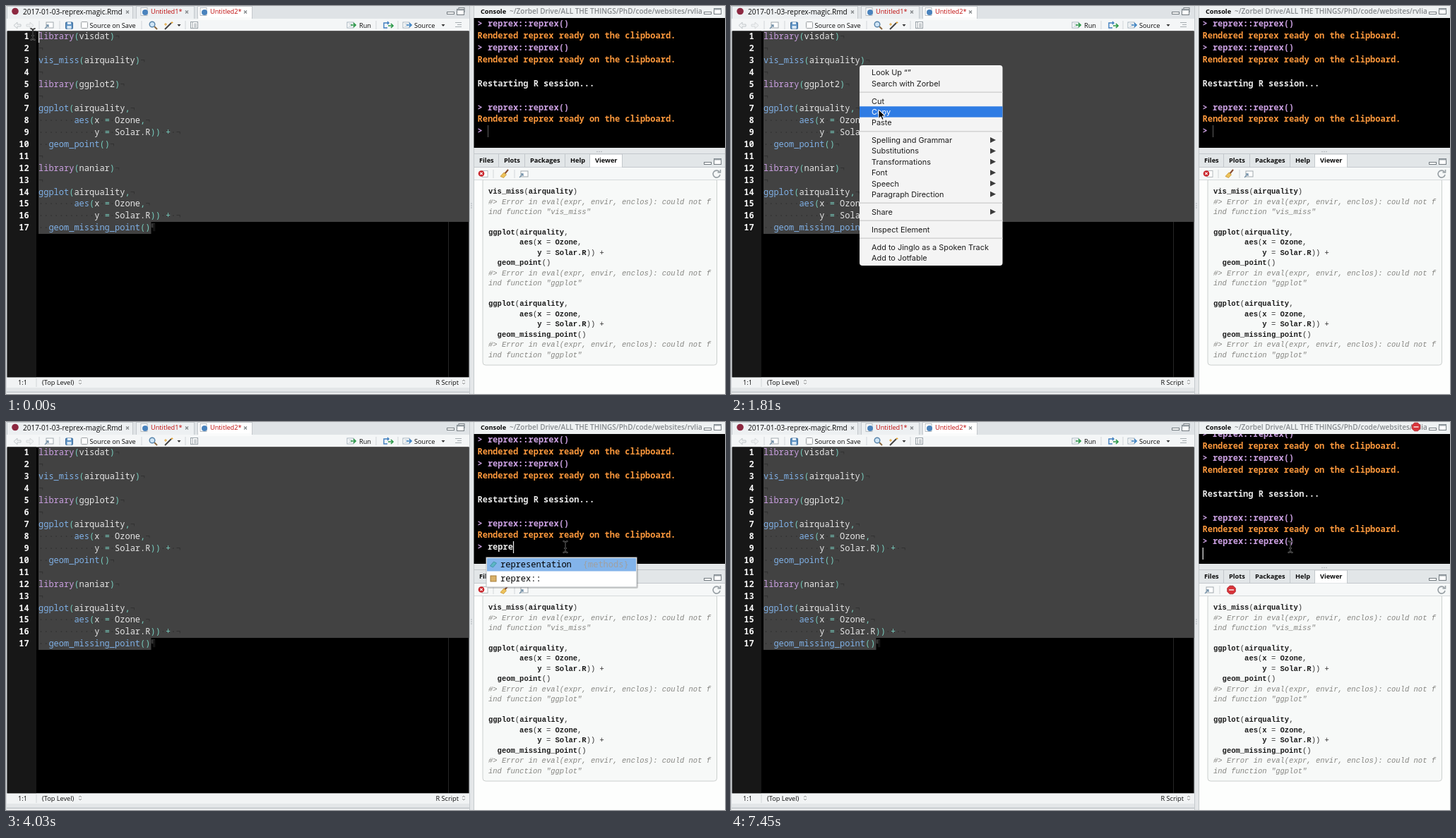
Recreate the animation shown at these times as an HTML page. Size 1018 by 550 pixels, loop 8000 ms.

```html
<!DOCTYPE html>
<html lang="en">
<head>
<meta charset="utf-8">
<title>Editor session</title>
<style>
html, body { margin: 0; width: 100%; height: 100%; overflow: hidden; background: #d9dde0; }
svg { display: block; width: 1018px; height: 550px; }
text { white-space: pre; font: 9.2px "Open Sans", sans-serif; fill: #0a0a0a; }
.bold { font-weight: 700; }
.file { font-size: 10px; }
.path { font-size: 10px; font-weight: 600; fill: #85898c; }
.red { fill: #c00d0d; }
.code { font: 500 12px "Noto Sans Mono", monospace; fill: #e6e6e6; }
.log { font-weight: 600; }
.num { font-weight: 600; fill: #f6f6f6; text-anchor: end; }
.key { fill: #cba0e2; }
.fun { fill: #7fb0e6; }
.op { fill: #76cabb; }
.ghost { fill: #303030; }
.pkg { fill: #f0d04a; }
.msg { fill: #fb983c; }
.item { font: 500 12px "Noto Sans Mono", monospace; fill: #000; }
.from { fill: #a0a0a0; }
.out { font: 10.5px "Liberation Mono", monospace; fill: #333; }
.name { font-weight: 700; fill: #1c1c1c; }
.note { font-style: italic; fill: #868682; }
.menu { font: 10.9px Inter, sans-serif; fill: #1e1e1e; }
.picked { fill: #fff; }
</style>
</head>
<body>
<svg id="stage" viewBox="0 0 1018 550" xmlns="http://www.w3.org/2000/svg"></svg>
<script>
const LOOP = 8000, CELL = 7.2, ROW = 16.94;
const esc = s => s.replace(/&/g, '&amp;').replace(/</g, '&lt;').replace(/>/g, '&gt;');
const span = (cls, s) => `<tspan class="${cls}">${esc(s)}</tspan>`;
const raw = (x, y, cls, body) => `<text x="${x}" y="${y}" class="${cls}">${body}</text>`;
const text = (x, y, s, cls = '') => raw(x, y, cls, esc(s));
const rect = (x, y, w, h, fill, more = '') =>
  `<rect x="${x}" y="${y}" width="${w}" height="${h}" fill="${fill}" ${more}/>`;
const path = (d, stroke, width = 1, fill = 'none') =>
  `<path d="${d}" stroke="${stroke}" stroke-width="${width}" fill="${fill}"/>`;
const dot = (x, y, r, fill) => `<circle cx="${x}" cy="${y}" r="${r}" fill="${fill}"/>`;
const group = (id, body, more = '') => `<g id="${id}" ${more}>${body}</g>`;

// Syntax colouring
function paint(line, dots) {
  return line.replace(/[\w.]+|\s|[^\w.\s]/g, (tok, at) => {
    if (tok === ' ') return dots ? span('ghost', '·') : ' ';
    if (!/\w/.test(tok)) return span('op', tok);
    if (tok === 'library') return span('key', tok);
    if (line.startsWith('::', at + tok.length)) return span('pkg', tok);
    return line[at + tok.length] === '(' ? span('fun', tok) : esc(tok);
  });
}

const plot = geom => ['ggplot(airquality,', '       aes(x = Ozone,', '           y = Solar.R)) +', `  ${geom}()`];
const script = ['library(visdat)', '', 'vis_miss(airquality)', '', 'library(ggplot2)', '',
  ...plot('geom_point'), '', 'library(naniar)', '', ...plot('geom_missing_point')];
const failure = fn => ['#> Error in eval(expr, envir, enclos): could not f', `ind function "${fn}"`];
const report = ['vis_miss(airquality)', ...failure('vis_miss'), '', ...plot('geom_point'),
  ...failure('ggplot'), '', ...plot('geom_missing_point'), ...failure('ggplot')];

// Small icons
const closeMark = x => path(`M${x - 2} 6.5l4 4m0 -4l-4 4`, '#85898c', 1.3);
const sizeBox = (x, y) => rect(x, y, 10, 8, '#fff', 'stroke="#737b80"') + rect(x, y, 10, 2, '#9aa2a7');
const paneButtons = y => rect(988.5, y + 2.5, 10, 3, '#fff', 'stroke="#737b80"') + sizeBox(1002.5, y - 2.5);
const popout = (x, y) => rect(x - 4, y - 4, 10, 8, '#fff', 'stroke="#a1a9ae"') +
  path(`M${x - 6} ${y + 5}l5 -5m-3 0h3v3`, '#7290a8', 1.3);
const arrowTo = (x, y, dir, color) =>
  path(`M${x - 5 * dir} ${y - 1.5}h${5 * dir}v-3l${5 * dir} 4.5l${-5 * dir} 4.5v-3h${-5 * dir}z`, color, 1, '#f0f2f3');
const divider = (x, y) => path(`M${x} ${y - 6}v12`, '#d2d6d9');
const dropMark = (x, y) => path(`M${x - 2.5} ${y - 1}h5l-2.5 3z`, 'none', 0, '#333');
const updown = (x, y) => path(`M${x - 2} ${y - 1}l2 -2l2 2m-4 2l2 2l2 -2`, '#777', .8);
const sheet = (x, y) => rect(x - 4, y - 4, 9, 8, '#fff', 'stroke="#a6b4be"') +
  path(`M${x - 2} ${y - 1.5}h5m-5 3h5`, '#b7c3cc');
const goArrow = (x, y, color) => path(`M${x - 4} ${y}h7m-3 -3l3 3l-3 3`, color, 1.7);
const stopSign = (x, y, r) => {
  const k = r * .42;
  return path(`M${x - k} ${y - r}h${2 * k}L${x + r} ${y - k}v${2 * k}L${x + k} ${y + r}h${-2 * k}L${x - r} ${y + k}v${-2 * k}z`,
    '#a81c22', .8, '#d8343a') + rect(x - r * .6, y - 1, r * 1.2, 2, '#efb9b9');
};
const docTab = (x, label) => rect(x - 6, 2.5, 9, 11, '#fff', 'stroke="#a9b0b5" stroke-width=".8"') +
  dot(x, 9, 4, '#4a83bd') + text(x + 8, 11.3, label, 'red');

function sourcePane() {
  const lines = script.map((line, i) => {
    const y = 47.3 + i * ROW, end = i === script.length - 1 ? '¶' : '¬';
    const tail = line.endsWith('+') ? '·' : '';
    return text(32.6, y, String(i + 1), 'code num') + raw(46, y, 'code', paint(line, true) + span('ghost', tail + end));
  }).join('');
  return rect(0, 0, 657, 18, '#dfe3e6') +
    rect(1.5, .5, 178, 18, '#edf0f2', 'stroke="#c3c8cc"') + rect(184.5, .5, 82, 18, '#edf0f2', 'stroke="#c3c8cc"') +
    rect(271.5, .5, 77, 20, '#fff', 'stroke="#c3c8cc"') +
    rect(1, 18, 655, 18, '#f4f6f7') + rect(272, 16, 76, 4, '#fafbfb') +
    dot(13, 7.5, 4.8, '#8c2840') + text(24, 11.5, '2017-01-03-reprex-magic.Rmd', 'file') +
    docTab(197, 'Untitled1*') + docTab(281, 'Untitled2*') + [172, 256, 339].map(closeMark).join('') +
    rect(624.5, 8.5, 10, 3, '#fff', 'stroke="#737b80"') + rect(641, 2.5, 8, 6, '#fff', 'stroke="#737b80"') + sizeBox(638.5, 4.5) +
    arrowTo(16, 27.5, -1, '#c3c8cb') + arrowTo(34, 27.5, 1, '#d6d9db') +
    [47, 76, 192, 254, 524, 555].map(x => divider(x, 27)).join('') + popout(61, 27) +
    rect(84.5, 23, 10, 9.5, '#5d92c4', 'rx="1" stroke="#3f6c98"') + rect(87, 23, 5, 3, '#e7f0f8') + rect(86.5, 28, 6, 4.5, '#dbe8f3') +
    rect(106.5, 22.5, 9, 9, '#fff', 'rx="1" stroke="#9b9fa2"') + text(118.5, 30.7, 'Source on Save') +
    path('M210 29l4 4', '#8b6a42', 2) + '<circle cx="207" cy="26" r="3.8" fill="#cfe4f5" stroke="#5683aa" stroke-width="1.4"/>' +
    path('M225 33l9 -9', '#444', 2) + path('M226 24v4m-2 -2h4m7 -4v3m-1.5 -1.5h3', '#e2a132') + dropMark(245, 27) +
    rect(261.5, 22.5, 10, 9, '#fff', 'stroke="#98a1a7"') + path('M264 23v9m2 -6.5h4m-4 2h4m-4 2h4', '#98a1a7') +
    sheet(487, 27) + goArrow(492, 27, '#2f9a4b') + text(500, 30.7, 'Run') +
    path('M540 31h-5v-7h7m-2 -2l2 2l-2 2', '#3f7fc0', 1.4) + goArrow(545, 28, '#2f9a4b') +
    sheet(566, 27) + goArrow(571, 27, '#4286c5') + text(578, 30.7, 'Source') + dropMark(619, 27) +
    path('M636 23.5h9m-6 3h6m-9 3h9', '#a6adb1') +
    rect(1.5, 35.5, 654, 491, '#000') + rect(2, 35.5, 41, 491, '#171717') + path('M626.5 36V526', '#262626') +
    rect(46, 35.5, 609.5, 270.5, '#424242') + rect(46, 306, 159.5, 17, '#424242') + lines +
    rect(1, 526.5, 655, 14.5, '#f1f3f4') + text(17, 536.5, '1:1') + divider(43, 534) +
    text(51, 536.5, '(Top Level)') + updown(105, 533) + text(608.5, 536.5, 'R Script') + updown(648, 533) +
    rect(1, 541, 655, 5, '#e3e6e8') + path('M1 547.5H656', '#b9bec2') + rect(1, 548, 655, 2, '#eef0f1') +
    rect(656, 0, 6, 550, '#e4e7e9') + path('M656.5 0V550M662.5 0V550', '#c5cacd') +
    [280, 283, 286].map(y => dot(659, y, .8, '#a9afb3')).join('');
}

function consolePane() {
  const call = ['key', '> reprex::reprex()'], done = ['msg', 'Rendered reprex ready on the clipboard.'], gap = ['', ''];
  const log = [call, done, call, done, gap, ['', 'Restarting R session...'], gap, call, done, ['key', '> ']];
  const lines = log.map(([cls, s], i) => text(667.5, 29.2 + i * 16.9, s, 'code log ' + cls)).join('');
  return rect(663, 0, 355, 17, '#eef1f2') + text(672, 11.2, 'Console', 'bold') +
    text(713, 11.2, '~/Zorbel Drive/ALL THE THINGS/PhD/code/websites/rvlia', 'path') +
    rect(986, 1, 32, 14, '#eef1f2') + paneButtons(6) + group('busy', stopSign(970, 7, 5.8)) +
    rect(662.5, 17, 355.5, 184, '#000') +
    '<g clip-path="url(#screen)">' + group('scroll', lines + '<text id="input" x="681.9" y="181.3" class="code log"></text>') +
    rect(1011, 28, 5, 170, '#fff', 'id="thumb" rx="2.5"') + '</g>' + rect(0, 0, 1.2, 17, '#eee', 'id="caret"');
}

function viewerPane() {
  const lines = report.map((line, i) => {
    const note = /^(#>|ind)/.test(line);
    const body = note ? span('note', line) : line.replace(/[\w.]+/g, w => span('name', w));
    return raw(683, (266 + i * 14.47).toFixed(1), 'out', body);
  }).join('');
  const tabs = [[670, 'Files'], [705, 'Plots'], [742, 'Packages'], [799, 'Help'], [834, 'Viewer']];
  return rect(663, 201, 355, 8.5, '#e4e7e9') + [837, 840, 843].map(x => dot(x, 206.5, .8, '#a9afb3')).join('') +
    rect(663, 209, 355, 19, '#e2e6e8') + path('M663 209.5H1018M663 228.5H1018', '#c3c8cc') +
    [697.5, 734.5, 791.5].map(x => path(`M${x} 210v18`, '#c3c8cc')).join('') +
    rect(826.5, 210, 46, 19, '#fff', 'stroke="#c3c8cc"') +
    tabs.map(([x, s]) => text(x, 221.5, s, 'bold')).join('') + paneButtons(219) +
    rect(663, 247, 355, 303, '#fdfefd') + rect(675, 244, 331.5, 265, '#f7f9f8', 'rx="4" stroke="#ccd0ce"') +
    rect(663, 229, 355, 17.5, '#f6f8f8') + path('M663 246.5H1018', '#d5d9db') +
    path('M1010 235a5 5 0 1 0 1 4m.5 -7v4h-4', '#98a0a5', 1.6) +
    group('idleTools', rect(674, 233.5, 8, 9, '#fff', 'stroke="#b4babd"') + dot(673, 237.5, 4.3, '#c9262c') +
      path('M671.3 235.8l3.4 3.4m0 -3.4l-3.4 3.4', '#fff', 1.2) + divider(690, 238) +
      path('M711 232l-5 6', '#8a4c2f', 2) + path('M705 236l3.5 3l-4 4.5l-4.5 -2z', '#c89531', .8, '#edc35b') +
      divider(720, 238) + popout(733, 238)) +
    group('busyTools', popout(677, 238) + divider(692, 238) + stopSign(708.5, 238, 5.8)) + lines;
}

const menuItems = [[94, 'Look Up “”'], [109.5, 'Search with Zorbel'], [134.5, 'Cut'], [150, 'Copy'], [165.3, 'Paste'],
  [190, 'Spelling and Grammar', 1], [205.4, 'Substitutions', 1], [220.8, 'Transformations', 1], [236.2, 'Font', 1],
  [251.5, 'Speech', 1], [266.8, 'Paragraph Direction', 1], [291.7, 'Share', 1], [316.6, 'Inspect Element'],
  [341.5, 'Add to Jinglo as a Spoken Track'], [356.8, 'Add to Jotfable']];
function contextMenu() {
  const items = menuItems.map(([y, label, sub]) => text(199, y + 4, label, 'menu') +
    (sub ? path(`M367 ${y - 4}l8 4l-8 4z`, 'none', 0, '#3c3c3c') : '')).join('');
  return rect(182, 84, 202.5, 284, '#f4f4f4', 'rx="4"') +
    [122.3, 177.8, 279.3, 304.3, 329.2].map(y => path(`M182 ${y}h202.5`, '#d3d3d3', 1.5)).join('') +
    rect(182, 0, 202.5, 15.4, '#2f7ce4', 'id="hover"') + items;
}

function completions(x, width, rows, pkgAt) {
  const h = rows.length * 20 + 2;
  return rect(x + 2, 194, width, h, '#000', 'opacity=".18" rx="2"') +
    rect(x, 192, width, h, '#fff', 'stroke="#b9bdc0"') + rect(x + 1, 193, width - 2, 18.5, '#83b4ea', 'class="pick"') +
    rows.map(([name, from], i) => {
      const y = 202 + i * 20, isPkg = name.endsWith('::');
      return (isPkg ? rect(x + 6, y - 4, 8, 8, '#d9b26a', 'stroke="#a67c36"')
        : path(`M${x + 5.5} ${y + 2}l5 -6l4 2l-5 6z`, '#3a8fa0', .8, '#5cb6c4')) +
        text(x + 20, y + 4.2, name, 'item') + text(pkgAt, y + 4.2, from, 'item from');
    }).join('');
}

const exported = ['reprex', 'reprex_addin', 'reprex_clean', 'reprex_invert', 'reprex_rescue'].map(n => [n, '{reprex}']);
const candidates = [['representation', '{methods}'], ['reprex::', '']];
const beam = 'M-3.5 -8q3.5 0 3.5 3v10q0 3 -3.5 3M3.5 -8q-3.5 0 -3.5 3v10q0 3 3.5 3M-2 2h4';

document.getElementById('stage').innerHTML =
  '<defs><clipPath id="screen"><rect x="662" y="17" width="356" height="184"/></clipPath></defs>' +
  rect(0, 0, 1018, 550, '#d9dde0') + sourcePane() + consolePane() + viewerPane() +
  rect(46, 36, 1.2, 16, '#eaeaea', 'id="editCaret"') + group('menu', contextMenu()) +
  group('popFirst', completions(680, 213, candidates, 816.8)) + group('popSecond', completions(739, 198, exported, 869)) +
  group('beam', path(beam, '#6c6c6c', 1.8) + path(beam, '#1c1c1c', .8)) +
  group('arrow', path('M0 0v12.5l3 -2.7l2 4.7l2.2 -1l-2 -4.5h4z', '#fff', 1, '#000'));

// Step tables: [time, value]
const steps = {
  pointer: [[0, [38, 40]], [150, [88, 214]], [300, [150, 180]], [450, [178, 112]], [620, [180, 89]],
    [1070, [180, 86, 1]], [1220, [186, 95, 1]], [1370, [194, 109, 1]], [1520, [203, 132, 1]], [1670, [209, 147, 1]],
    [2110, [480, 164, 1]], [2250, [742, 172, 1]], [2400, [785, 176]], [2550, [792, 177]]],
  hover: [[0, -1], [1220, 0], [1370, 1], [1520, 2], [1670, 3], [1820, -1], [1960, 3]],
  menu: [[0, 0], [1070, 1], [2110, .6], [2250, .14], [2400, 0]],
  editCaret: [[0, 1], [450, 0], [920, 1], [1370, 0], [1820, 1], [2700, 0]],
  typed: [[0, ''], [3440, 're'], [3580, 'repr'], [3730, 'repre'], [4630, 'reprex::'], [5080, 'reprex::reprex()']],
  caret: [[0, .35], [2700, 1], [3290, 0], [3440, 1], [4330, 0], [4630, 1], [5970, 0], [6420, 1], [7010, 0], [7450, 1]],
  popup: [[0, 0], [4030, 1], [4630, 2], [5080, 0]],
  thumb: [[0, 0], [5520, .1], [5970, .05], [6120, 0]],
};
const at = (name, t) => steps[name].findLast(([start]) => start <= t)[1];
const el = id => document.getElementById(id);
const set = (id, name, value) => el(id).setAttribute(name, value);
const fade = (id, value) => set(id, 'opacity', +value);
const labels = [...document.querySelectorAll('#menu text')];
const firstPick = document.querySelector('#popFirst .pick');

function draw(t) {
  const [x, y, isArrow] = at('pointer', t), hover = at('hover', t);
  set('beam', 'transform', `translate(${x} ${y})`);
  set('arrow', 'transform', `translate(${x} ${y})`);
  fade('beam', !isArrow);
  fade('arrow', !!isArrow);

  fade('menu', at('menu', t));
  fade('hover', hover >= 0);
  set('hover', 'y', hover < 0 ? 0 : menuItems[hover][0] - 7.7);
  labels.forEach((label, i) => label.classList.toggle('picked', i === hover));
  fade('editCaret', at('editCaret', t));

  const running = t >= 5520, typed = at('typed', t);
  set('scroll', 'transform', `translate(0 ${running ? -8 : 0})`);
  el('input').innerHTML = running ? span('key', typed) : paint(typed, false);
  set('caret', 'x', running ? 667.6 : 681.9 + typed.length * CELL);
  set('caret', 'y', running ? 178 : 169);
  fade('caret', at('caret', t));
  fade('thumb', at('thumb', t));

  const popup = at('popup', t);
  fade('popFirst', popup === 1);
  fade('popSecond', popup === 2);
  firstPick.setAttribute('transform', `translate(0 ${t >= 4330 ? 20 : 0})`);
  fade('idleTools', !running);
  fade('busyTools', running);
  fade('busy', t >= 6560);
}

const start = performance.now();
function tick() {
  draw((performance.now() - start) % LOOP);
  requestAnimationFrame(tick);
}
tick();
</script>
</body>
</html>
```
